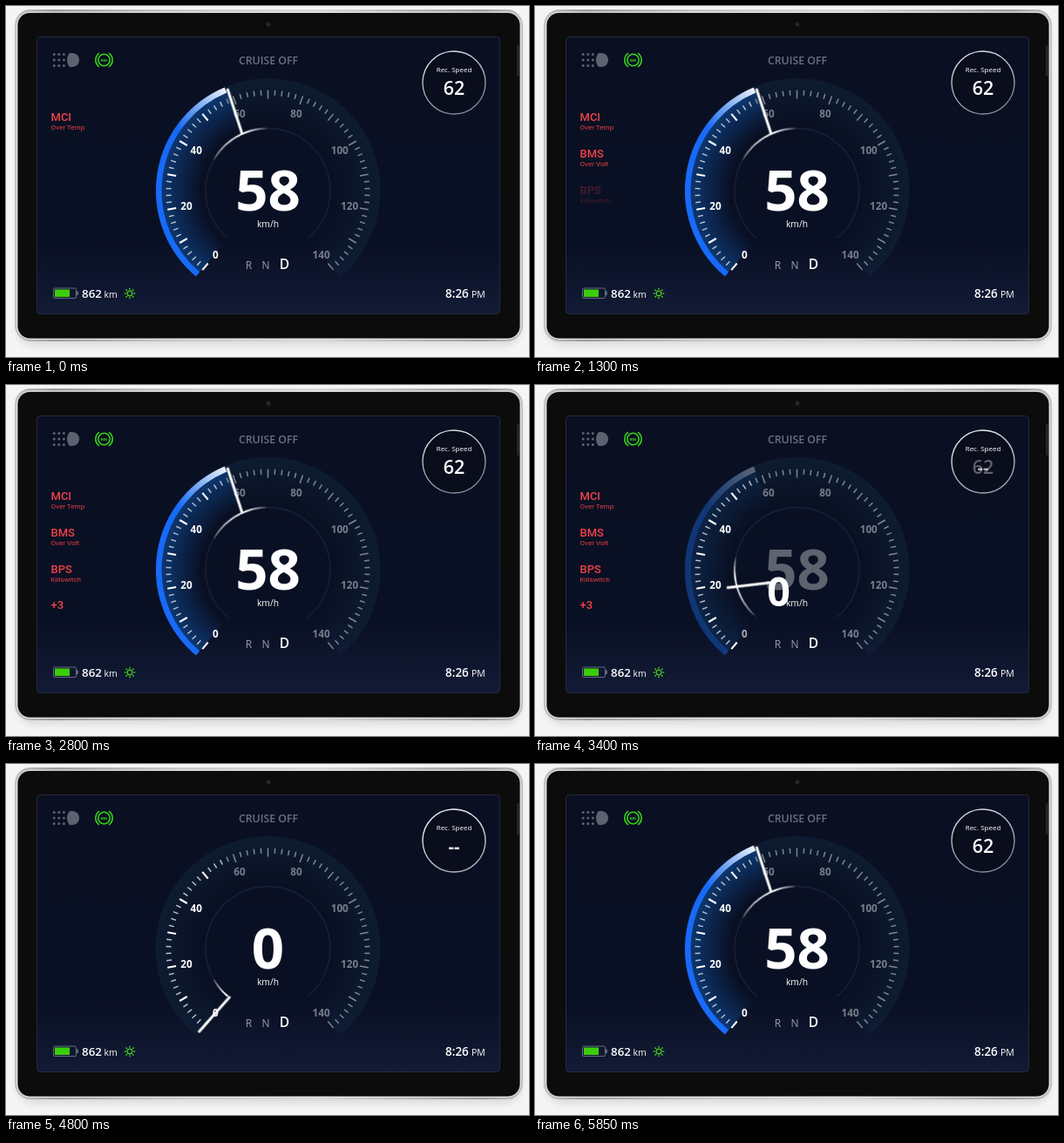
Recreate the animation shown at these times as an HTML page. Size 600x403 px, loop 5.9 s.

```html
<!DOCTYPE html>
<html lang="en">
<head>
<meta charset="utf-8">
<title>Dashboard</title>
<style>
html, body { margin: 0; width: 100%; height: 100%; overflow: hidden; background: #f5f5f5; }
svg { display: block; width: 600px; height: 403px; font-family: "Open Sans", "Noto Sans", sans-serif; fill: #fff; }
.mid { text-anchor: middle; }
.semi { font-weight: 600; }
.bold { font-weight: 700; }
.dim { fill: #777e8b; }
.line { fill: none; }
.warn { font-family: Roboto, sans-serif; fill: #f04347; }
.warn .code { font-size: 13px; font-weight: 500; }
.warn .note { font-size: 8.1px; fill: #e23e42; }

.moving, .idle, .needle, .zero, .trail, .warn, .warn g { animation: 5900ms ease-out infinite; }
.moving { animation-name: moving; }
.idle { animation-name: idle; }
.needle { animation-name: needle; }
.zero { animation-name: zero; }
.trail { animation-name: trail; transform-origin: 300.5px 212px; }
.warn { animation-name: clear; }
.warn .w1 { animation-name: second; }
.warn .w2 { animation-name: third; }
.warn .w3 { animation-name: more; }

@keyframes moving {
  0%, 55.254% { opacity: 1; }
  60.339%, 83.898% { opacity: 0; }
  88.983%, 100% { opacity: 1; }
}
@keyframes idle {
  0%, 55.254% { opacity: 0; }
  60.339%, 83.898% { opacity: 1; }
  88.983%, 100% { opacity: 0; }
}
@keyframes needle {
  0%, 55.254% { transform: translate(262.5px, 121px) rotate(251.9deg); }
  60.339%, 83.898% { transform: translate(239px, 287.5px) rotate(131.3deg); }
  88.983%, 100% { transform: translate(262.5px, 121px) rotate(251.9deg); }
}
@keyframes zero {
  0%, 55.254% { transform: translate(240.3px, 285.8px) scale(.18); }
  60.339%, 83.898% { transform: translate(300.5px, 211.3px) scale(1); }
  88.983%, 100% { transform: translate(240.3px, 285.8px) scale(.18); }
}
@keyframes trail {
  0%, 55.254% { transform: rotate(118deg); }
  60.339%, 83.898% { transform: rotate(0deg); }
  88.983%, 100% { transform: rotate(118deg); }
}
@keyframes clear { 0%, 67.797% { opacity: 1; } 72.881%, 100% { opacity: 0; } }
@keyframes second { 0%, 2.542% { opacity: 0; } 7.627%, 100% { opacity: 1; } }
@keyframes third { 0%, 21.186% { opacity: 0; } 26.271%, 100% { opacity: 1; } }
@keyframes more { 0%, 36.441% { opacity: 0; } 41.525%, 100% { opacity: 1; } }
</style>
</head>
<body>
<svg viewBox="0 0 600 403">
  <defs>
    <linearGradient id="metal" x1="0" y1="0" x2="1" y2="0">
      <stop offset="0" stop-color="#c4c4c4"/><stop offset=".08" stop-color="#9c9c9c"/>
      <stop offset=".3" stop-color="#c6c6c6"/><stop offset=".6" stop-color="#d8d8d8"/>
      <stop offset=".92" stop-color="#9c9c9c"/><stop offset="1" stop-color="#c4c4c4"/>
    </linearGradient>
    <linearGradient id="screen" x1="0" y1="0" x2="0" y2="1">
      <stop offset="0" stop-color="#0a1022"/><stop offset=".75" stop-color="#0a1024"/>
      <stop offset="1" stop-color="#121b36"/>
    </linearGradient>
    <linearGradient id="ring" x1="0" y1="0" x2=".4" y2="1">
      <stop offset="0" stop-color="#eceef1"/><stop offset="1" stop-color="#858b98"/>
    </linearGradient>
    <linearGradient id="power" gradientUnits="userSpaceOnUse" x1="196" y1="137" x2="254" y2="95">
      <stop offset="0" stop-color="#186af8"/><stop offset=".4" stop-color="#6ea2f2"/>
      <stop offset="1" stop-color="#f4f7fc"/>
    </linearGradient>
    <radialGradient id="band" gradientUnits="userSpaceOnUse" cx="300.5" cy="212" r="129">
      <stop offset=".58" stop-color="#10243b" stop-opacity="0"/><stop offset="1" stop-color="#10243b" stop-opacity=".6"/>
    </radialGradient>
    <radialGradient id="glow" gradientUnits="userSpaceOnUse" cx="300.5" cy="212" r="124">
      <stop offset=".62" stop-color="#0d4fa8" stop-opacity="0"/><stop offset="1" stop-color="#0d57b8" stop-opacity=".5"/>
    </radialGradient>
    <clipPath id="dial"><path d="M300.5 212L198 334V100H420V334Z"/></clipPath>
    <filter id="soft" x="-10%" y="-10%" width="120%" height="130%"><feGaussianBlur stdDeviation="4"/></filter>
  </defs>

  <rect width="600" height="403" fill="#f5f5f5"/>
  <rect x="12" y="10" width="579" height="380" rx="20" fill="#000" opacity=".1" filter="url(#soft)"/>
  <rect x="10" y="4" width="583" height="381" rx="18" fill="url(#metal)"/>
  <rect x="12.5" y="7" width="578" height="375.5" rx="15.5" class="line" stroke="#e4e4e4"/>
  <rect x="13.5" y="8" width="576" height="373.5" rx="14" fill="#0c0c0d"/>
  <rect x="586" y="45" width="3" height="36" rx="1" fill="#242426"/>
  <circle cx="301" cy="21" r="3" fill="#1b1b1e"/><circle cx="301" cy="21" r="1.2" fill="#39393f"/>
  <rect x="35.5" y="35.5" width="531" height="318" rx="4" fill="url(#screen)" stroke="#2b334a" stroke-width=".8"/>

  <g id="lamp" fill="#5d6270"><path d="M73 54C69 58 69 66 73 70H76C81 70 84 66 84 62S81 54 76 54Z"/></g>
  <g class="line" stroke="#39d31a" stroke-width="1.6">
    <circle cx="112.5" cy="62" r="6.7"/>
    <path d="M107 54.1A9.6 9.6 0 0 0 107 69.9M118 54.1A9.6 9.6 0 0 1 118 69.9"/>
  </g>
  <text x="112.5" y="63.5" class="mid bold" font-size="4.2" fill="#39d31a">RBS</text>
  <text x="301" y="67" class="mid semi" font-size="12.3" fill="#6b7180">CRUISE OFF</text>

  <circle cx="514" cy="88" r="36" fill="#090d1c" stroke="url(#ring)" stroke-width="1.3"/>
  <circle cx="514" cy="88" r="36" class="line idle" stroke="#fff" stroke-opacity=".35" stroke-width="1.3"/>
  <text x="514" y="76" class="mid" font-size="8">Rec. Speed</text>
  <text x="514" y="101.8" class="mid semi moving" font-size="21.5">62</text>
  <text x="514" y="101.8" class="mid bold idle" font-size="20">--</text>

  <g id="gauge"></g>
  <path id="rim" class="line" stroke="#18223a" stroke-width="1.3"/>
  <g clip-path="url(#dial)"><g id="trail" class="trail"></g></g>
  <text x="240.3" y="290" class="mid bold idle" font-size="11.7">0</text>
  <line class="needle" x1="-27.4" x2="27.4" y1="0" y2="0" stroke="#fff" stroke-width="2.8"/>
  <text x="300.5" y="234.8" class="mid bold moving" font-size="65.3">58</text>
  <text x="0" y="23.5" class="mid bold zero" font-size="65.3">0</text>
  <text x="300.5" y="254.2" class="mid" font-size="10.3">km/h</text>
  <text x="278.5" y="301.7" class="mid" font-size="12" fill="#9ba0ac">R</text>
  <text x="298" y="301.7" class="mid" font-size="12" fill="#9ba0ac">N</text>
  <text x="319.5" y="302" class="mid semi" font-size="15.5">D</text>

  <g class="warn" id="warn"></g>

  <rect x="54.5" y="324" width="26" height="11.5" rx="1.5" class="line" stroke="#666d7d"/>
  <rect x="81" y="327.5" width="1.8" height="4.5" fill="#666d7d"/>
  <rect x="56" y="325.5" width="17" height="8.5" fill="#3ccd0a"/>
  <text x="87" y="335" class="semi" font-size="13.4">862</text>
  <text x="112.5" y="335.3" font-size="10.5">km</text>
  <g id="sun" class="line" stroke="#48d51d" stroke-width="1.3" transform="translate(142 330)"><circle r="2.9"/></g>
  <text x="504" y="335" class="semi" font-size="13.5">8:26</text>
  <text x="534" y="335.3" font-size="10.5">PM</text>
</svg>
<script>
const NS = 'http://www.w3.org/2000/svg';
const byId = id => document.getElementById(id);
function add(parent, tag, attrs, text) {
  const el = document.createElementNS(NS, tag);
  for (const k in attrs) el.setAttribute(k, attrs[k]);
  if (text) el.textContent = text;
  parent.appendChild(el);
  return el;
}

// Angles run clockwise from straight down; each km/h spans two degrees.
function polar(r, deg, cy = 212) {
  const a = deg * Math.PI / 180;
  return [300.5 - r * Math.sin(a), cy + r * Math.cos(a)];
}
const arc = (r, from, to) =>
  `M${polar(r, from)}A${r} ${r} 0 ${to - from > 180 ? 1 : 0} 1 ${polar(r, to)}`;

const gauge = byId('gauge');
const stroke = (parent, d, color, width, cls = '') =>
  add(parent, 'path', { d, stroke: color, 'stroke-width': width, class: 'line ' + cls });

stroke(gauge, arc(102, 40, 320), 'url(#band)', 54);
stroke(gauge, arc(99, 40, 157), 'url(#glow)', 48, 'moving');
stroke(gauge, arc(125.2, 40, 157.2), 'url(#power)', 6.6, 'moving');

// The scale sits slightly lower than the band behind it.
const scaleY = 213.5;
for (let v = 0; v <= 140; v += 2) {
  const major = v % 10 === 0, lit = v < 58, deg = 40 + v * 2;
  const color = lit ? (major ? '#fff' : '#b8c1ce') : '#7f8794';
  stroke(gauge, `M${polar(major ? 107 : 111, deg, scaleY)}L${polar(117, deg, scaleY)}`, color, major && lit ? 2.1 : 1.5);
}
for (let v = 20; v <= 140; v += 20) {
  const [x, y] = polar(95, 40 + v * 2, scaleY);
  add(gauge, 'text', { x, y: y + 4.2, 'font-size': 11.7, class: 'mid bold' + (v < 58 ? '' : ' dim') }, v);
}

byId('rim').setAttribute('d', arc(71.5, 40, 320));
for (let d = -40; d < 20; d += 2) {
  const alpha = d < 0 ? (1 + d / 40) ** .6 : 1 - d / 22;
  stroke(byId('trail'), arc(71.5, 40 + d, 42.1 + d), `rgba(255,255,255,${alpha})`, 2.1);
}

const warnings = [['MCI', 'Over Temp'], ['BMS', 'Over Volt'], ['BPS', 'Killswitch'], ['+3', '']];
warnings.forEach(([code, note], i) => {
  const g = add(byId('warn'), 'g', { class: 'w' + i }), y = 132 + i * 41.8;
  add(g, 'text', { x: 51.5, y, class: 'code' }, code);
  if (note) add(g, 'text', { x: 51.5, y: y + 10.4, class: 'note' }, note);
});

for (let i = 0; i < 9; i++)
  add(byId('lamp'), 'circle', { cx: 55.2 + i % 3 * 5.6, cy: 55.5 + Math.floor(i / 3) * 6.5, r: 1.5 });
for (let i = 0; i < 8; i++)
  add(byId('sun'), 'path', { d: 'M0 -4.3V-6.3', transform: `rotate(${i * 45})` });
</script>
</body>
</html>
```
